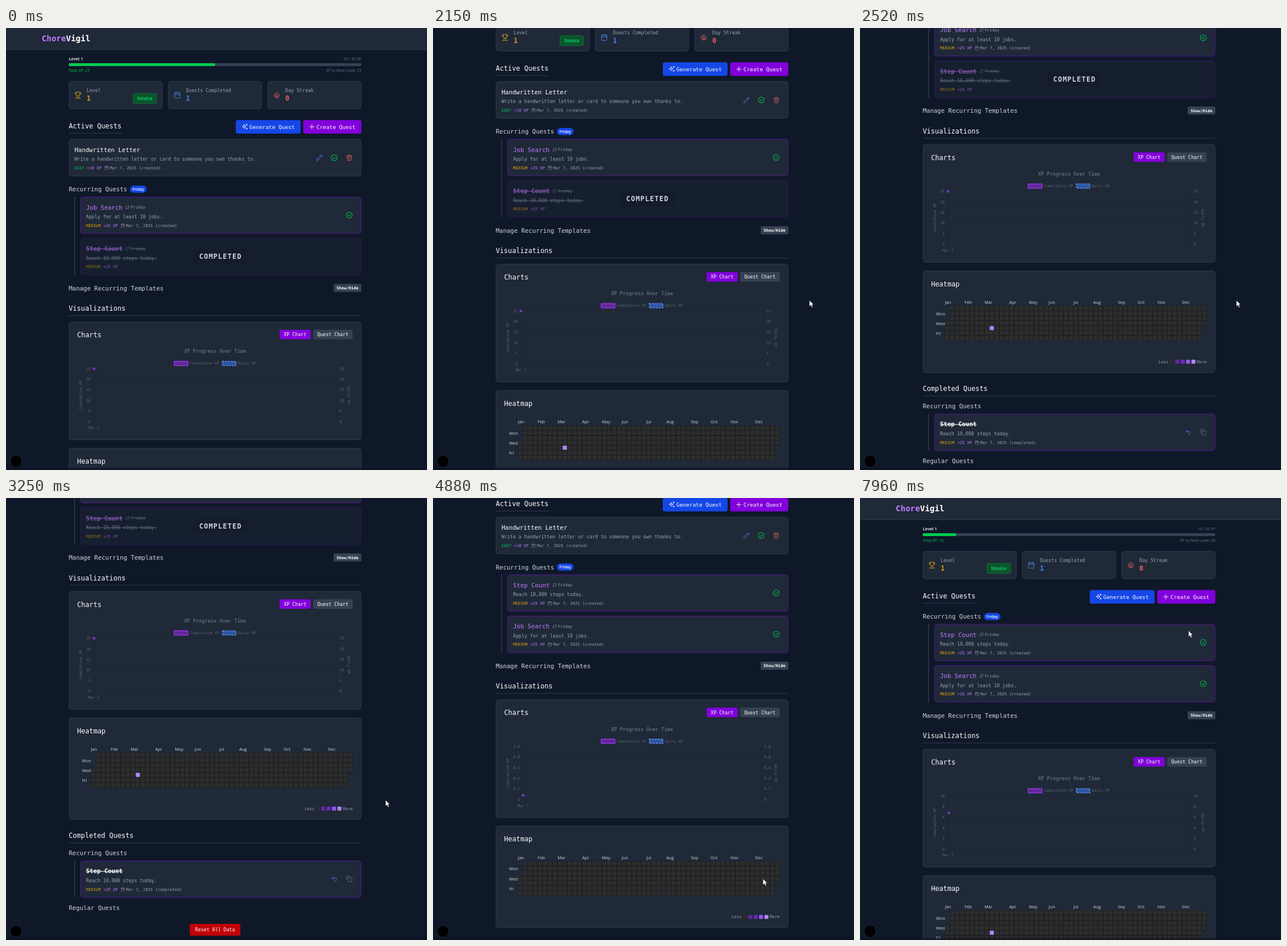
An HTML page for the animation above (8000 ms loop, 731 by 766 pixels).

```html
<!DOCTYPE html>
<html lang="en">
<head>
<meta charset="utf-8">
<title>Quest dashboard</title>
<style>
  html, body { margin: 0; width: 100%; height: 100%; overflow: hidden; background: #0f1828; }
  svg { display: block; width: 731px; height: 766px; }
  text { font-family: "DejaVu Sans Mono", "Noto Sans Mono", monospace; white-space: pre; }
  .sans { font-family: "Open Sans", "Noto Sans", sans-serif; }
  .mid { text-anchor: middle; }
  .end { text-anchor: end; }
  .w6 { font-weight: 600; }
  .w7 { font-weight: 700; }
  .strike { text-decoration: line-through; }
  .done { opacity: .6; filter: blur(.35px); }
</style>
</head>
<body>
<svg id="stage" viewBox="0 0 731 766"></svg>
<script>
const LOOP = 8000, S = .5848;
const C = {
  card: '#1f2938', line: '#364153', white: '#fff', soft: '#d1d5dc', gray: '#99a1af', dim: '#6a7282',
  lilac: '#c27aff', purple: '#8200db', edge: '#6e11b0', blue: '#1447e6', sky: '#4a86e6', green: '#00c950',
  gold: '#d39e12', red: '#e0635f', axis: '#5f6672', cell: '#2d2d2c', hot: '#b185f5'
};

const ICONS = {
  trophy: 'M6 9H4.5a2.5 2.5 0 0 1 0-5H6M18 9h1.5a2.5 2.5 0 0 0 0-5H18M4 22h16M10 14.7V17c0 .6-.5 1-1 1.2C7.9 18.7 7 20.2 7 22M14 14.7V17c0 .6.5 1 1 1.2 1.1.5 2 2 2 3.8M18 2H6v7a6 6 0 0 0 12 0z',
  calendar: 'M8 2v4M16 2v4M3 10h18M5 4h14a2 2 0 0 1 2 2v14a2 2 0 0 1-2 2H5a2 2 0 0 1-2-2V6a2 2 0 0 1 2-2z',
  flame: 'M15.4 5.2A8.25 8.25 0 0 1 12 21 8.25 8.25 0 0 1 6 7a8.3 8.3 0 0 0 3 2.6 9 9 0 0 1 3.4-6.9 8.2 8.2 0 0 0 3 2.5zM12 18a3.75 3.75 0 0 0 .5-7.5 6 6 0 0 0-1.9 3.6 6 6 0 0 1-2.100-1A3.75 3.75 0 0 0 12 18z',
  sparkles: 'M10 4l1.8 5.2L17 11l-5.2 1.8L10 18l-1.8-5.2L3 11l5.2-1.8zM19 2v5M16.5 4.5h5M19 16v5M16.5 18.5h5',
  plus: 'M4 12h16M12 4v16',
  pencil: 'M17 3a2.8 2.8 0 0 1 4 4L7.5 20.5 2 22l1.5-5.5zM15 5l4 4',
  check: 'M21 12a9 9 0 1 1-18 0 9 9 0 0 1 18 0M9 12.75 11.25 15 15 9.75',
  trash: 'M3 6h18M19 6v14a2 2 0 0 1-2 2H7a2 2 0 0 1-2-2V6M8 6V4a2 2 0 0 1 2-2h4a2 2 0 0 1 2 2v2M10 11v6M14 11v6',
  refresh: 'M3 12a9 9 0 0 1 15.5-6.3L21 8M21 3v5h-5M21 12a9 9 0 0 1-15.5 6.3L3 16M3 21v-5h5',
  undo: 'M9 14 4 9l5-5M4 9h10.5a5.5 5.5 0 0 1 0 11H11',
  copy: 'M10 8h10a2 2 0 0 1 2 2v10a2 2 0 0 1-2 2H10a2 2 0 0 1-2-2V10a2 2 0 0 1 2-2zM4 16a2 2 0 0 1-2-2V4a2 2 0 0 1 2-2h10a2 2 0 0 1 2 2'
};

// y is the middle of the capitals; size is in page pixels before scaling
const text = (s, x, y, size, fill, cls = '', more = '') =>
  `<text x="${x}" y="${y + size * S * .365}" font-size="${size * S}" fill="${fill}" class="${cls}" ${more}>${s}</text>`;
const rect = (x, y, x2, y2, fill, r = 0, more = '') =>
  `<rect x="${x}" y="${y}" width="${x2 - x}" height="${y2 - y}" rx="${r}" fill="${fill}" ${more}/>`;
const box = (x, y, x2, y2, stroke = C.line, more = '') =>
  rect(x + .4, y + .4, x2 - .4, y2 - .4, C.card, 4.5, `stroke="${stroke}" stroke-width=".8" ${more}`);
const line = (x, y, x2, y2, stroke = C.line, w = .8) =>
  `<path d="M${x} ${y}L${x2} ${y2}" stroke="${stroke}" stroke-width="${w}"/>`;
const icon = (name, cx, cy, size, color) =>
  `<path d="${ICONS[name]}" transform="translate(${cx - size / 2} ${cy - size / 2}) scale(${size / 24})"
    fill="none" stroke="${color}" stroke-width="1.8" stroke-linecap="round" stroke-linejoin="round"/>`;
const shift = (dy, body) => `<g transform="translate(0 ${dy})">${body}</g>`;

function tags(x, y, level, color, xp, date) {
  const x2 = x + (level.length + 1) * 4.225 + .4;
  return text(level, x, y, 12, color) + text(xp, x2, y, 12, C.lilac) +
    (date ? icon('calendar', x2 + 34, y, 7.2, C.gray) + text(date, x2 + 39.6, y, 12, C.gray) : '');
}

function stat(x, name, glyph, value, color) {
  return box(x, 92, x + 163, 140.5) + icon(glyph, x + 16, 116.3, 12.5, color) +
    text(name, x + 31, 107.8, 14, C.gray) + text(value, x + 31, 122.2, 20, color, 'w7');
}

function header(p) {
  return rect(0, 0, 731, 37.5, C.card) + line(0, 37.5, 731, 37.5) +
    text('Chore<tspan fill="#fff">Vigil</tspan>', 62, 18.3, 24, C.lilac, 'w7') +
    text('Level 1', 109, 53.3, 12.8, C.white, 'sans w6') +
    text(`${p.xp} / 50 XP`, 617, 53.3, 11.5, C.dim, 'sans end') +
    rect(109, 61, 617, 66, C.line, 2) + rect(109, 61, 109 + 508 * p.xp / 50, 66, C.green, p.xp ? 1.5 : 0, 'data-bar') +
    text('Total XP: ' + p.xp, 109, 73.3, 11.5, C.green, 'sans') +
    text('XP to Next Level: ' + (50 - p.xp), 617, 73.3, 11.5, C.dim, 'sans end') +
    stat(109, 'Level', 'trophy', 1, C.gold) +
    rect(220.4, 113.4, 261.6, 130.6, '#0d542b', 3, 'stroke="#008236" stroke-width=".8"') +
    text('Novice', 241, 122.2, 13.8, '#05df72', 'sans w6 mid') +
    stat(281.3, 'Quests Completed', 'calendar', p.count, C.sky) +
    stat(454, 'Day Streak', 'flame', 0, C.red) +
    text('Active Quests', 109, 169.3, 20, C.white) + line(109, 182.3, 201, 182.3) +
    rect(399, 159.5, 511.5, 183, C.blue, 3.5) + icon('sparkles', 414.5, 171.2, 11.7, C.white) +
    text('Generate Quest', 422.5, 171.2, 16, C.white) +
    rect(516, 159.5, 617, 183, C.purple, 3.5) + icon('plus', 531, 171.2, 11.7, C.white) +
    text('Create Quest', 539, 171.2, 16, C.white);
}

function letterCard() {
  return '<g data-letter>' + box(109, 192.5, 617, 257) +
    text('Handwritten Letter', 119, 210.7, 18, C.white) +
    text('Write a handwritten letter or card to someone you own thanks to.', 119, 227.3, 14, C.gray) +
    tags(119, 242.3, 'EASY', C.green, '+10 XP', 'Mar 7, 2025 (created)') +
    '<circle data-hover cx="570" cy="224.8" r="11" fill="#364153" opacity="0"/>' +
    icon('pencil', 544.3, 224.8, 11.5, C.sky) + icon('check', 570, 224.8, 13.5, C.green) +
    icon('trash', 596, 224.8, 11.5, C.red) + '</g>';
}

function recurring(dy, name, desc, done) {
  const st = done ? 'strike' : '';
  const body = text(name, 139, 310.7, 18, C.lilac, done ? 'w7 strike' : '') +
    icon('refresh', 211, 310.7, 7, C.gray) + text('Friday', 216.7, 310.5, 12, C.gray, st) +
    text(desc, 139, 327.2, 14, C.gray, st) +
    tags(139, 342.2, 'MEDIUM', '#e3a008', '+25 XP', done ? '' : 'Mar 7, 2025 (created)') +
    (done ? '' : icon('check', 596, 324.3, 13.5, C.green));
  const stamp = rect(326, 311.5, 419, 337, '#141c2c', 3) +
    text('COMPLETED', 335.5, 324.7, 20, C.soft, 'w7', 'letter-spacing="1.17"');
  return shift(dy, box(129, 292.5, 617, 356.5, C.edge, done ? 'opacity=".45"' : '') +
    `<g class="${done ? 'done' : ''}">${body}</g>` + (done ? stamp : ''));
}

function chart(p) {
  let s = box(109, 509, 617, 714) + text('Charts', 123.5, 531.9, 20, C.white) +
    rect(475, 523, 529, 539.5, C.purple, 2.5) + text('XP Chart', 502, 531.5, 14, C.white, 'mid') +
    rect(533.5, 523, 602, 539.5, C.line, 2.5) + text('Quest Chart', 567.5, 531.5, 14, C.white, 'mid') +
    text('XP Progress Over Time', 363, 560.2, 14.6, C.axis, 'w7 mid') +
    rect(292.2, 577.7, 315.8, 585, '#602799', 0, 'stroke="#8f35dc" stroke-width="1.6"') +
    text('Cumulative XP', 319.3, 581, 11.1, C.axis) +
    rect(375.7, 577.7, 399.3, 585, '#2d55a5', 0, 'stroke="#5f92e4" stroke-width="1.6" stroke-dasharray="3 2"') +
    text('Daily XP', 402.4, 581, 11.1, C.axis);
  const pad = p.wide ? 4 : 0;
  p.ticks.forEach((v, i) => {
    const y = 590.3 + i * 18.4;
    s += line(153 + pad, y, 574 - pad, y, 'rgba(0,0,0,.1)', .6) +
      text(v, 147 + pad, y, 11.1, C.axis, 'end') + text(v, 579 - pad, y, 11.1, C.axis);
  });
  const turned = (label, x, y, a) =>
    `<g transform="translate(${x} ${y}) rotate(${a})">${text(label, 0, 0, 11.1, C.axis, 'mid')}</g>`;
  return s + line(153 + pad, 590, 153 + pad, 686, 'rgba(0,0,0,.1)', .6) +
    line(574 - pad, 590, 574 - pad, 682, 'rgba(0,0,0,.1)', .6) +
    text('Mar 7', 152.7 + pad, 693, 11.1, C.axis, 'mid') +
    turned('Cumulative XP', 130, 636.5, -90) + turned('Daily XP', 595.5, 636.5, 90) +
    '<circle data-dot r="1.7" fill="#5b2a92" stroke="#8f45e6" stroke-width="1.1"/>';
}

function heatmap(hot) {
  const step = 8.58, size = 7.3, x0 = 148, y0 = 789.5;
  const weeks = [0, 4, 8, 13, 17, 21, 26, 30, 35, 39, 43, 48];
  let s = box(109, 728, 617, 905) + text('Heatmap', 123.5, 751, 20, C.white);
  'Jan Feb Mar Apr May Jun Jul Aug Sep Oct Nov Dec'.split(' ').forEach((m, i) =>
    s += text(m, x0 - .5 + weeks[i] * step, 782.7, 12.7, C.soft, 'sans'));
  ['Mon', 'Wed', 'Fri'].forEach((d, i) => s += text(d, 132, 802.5 + i * 17.1, 12.7, C.soft, 'sans'));
  for (let day = 3; day < 368; day++) {
    const col = Math.floor(day / 7), row = day % 7, x = x0 + col * step, y = y0 + row * step;
    s += rect(x, y, x + size, y + size, hot && col === 9 && row === 4 ? C.hot : C.cell, 1,
      'stroke="#1a1c1f" stroke-width="1.2" paint-order="stroke"');
  }
  s += text('Less', 518.5, 885.7, 12, C.gray) + text('More', 585, 885.7, 12, C.gray);
  [C.cell, '#5b2c98', '#7424c4', '#9357e8', C.hot].forEach((c, i) =>
    s += rect(538 + i * 9.35, 882.2, 545 + i * 9.35, 889.2, c, 1.5));
  return s;
}

function completed(has) {
  const list = text('Recurring Quests', 109, 962.8, 18, C.soft) + line(119.3, 976, 119.3, 1040, C.line, 1.2) +
    box(129, 976, 617, 1040, C.edge) + text('Step Count', 139, 994, 18, C.white, 'w7 strike') +
    text('Reach 10,000 steps today.', 139, 1010.7, 14, C.gray) +
    tags(139, 1025.7, 'MEDIUM', C.gold, '+25 XP', 'Mar 7, 2025 (completed)') +
    icon('undo', 570, 1007.8, 11.5, C.sky) + icon('copy', 596, 1007.8, 11.5, C.dim) +
    text('Regular Quests', 109, 1057.8, 18, C.soft);
  const none = text('No completed quests yet. Complete some quests to see them here!', 362.7, 980.2, 16, C.gray, 'mid');
  return text('Completed Quests', 109, 932, 20, C.white) + line(109, 945, 617, 945) + (has ? list : none) +
    shift(has ? 0 : -60, rect(319, 1085.5, 407, 1106, '#c10007', 2.5) +
      text('Reset All Data', 363, 1095.7, 14, C.white, 'mid'));
}

function page(p) {
  const job = ['Job Search', 'Apply for at least 10 jobs.'], steps = ['Step Count', 'Reach 10,000 steps today.'];
  const [a, b] = p.stepsDone ? [job, steps] : [steps, job];
  const lower = text('Recurring Quests', 109, 279.5, 18, C.soft) + rect(215.3, 273.3, 244, 285.6, C.blue, 6.1) +
    text('Friday', 229.6, 279.5, 11.5, C.white, 'sans mid w6') + line(119.3, 292, 119.3, 428.5, C.line, 1.2) +
    recurring(0, ...a) + recurring(71.5, ...b, p.stepsDone) +
    text('Manage Recurring Templates', 109, 450.7, 18, C.soft) +
    rect(569, 443.5, 617, 457.5, C.line, 2) + text('Show/Hide', 593, 450.5, 12, C.white, 'w6 mid') +
    text('Visualizations', 109, 486, 20, C.white) + line(109, 498.5, 617, 498.5) +
    chart(p) + heatmap(p.hot) + completed(p.stepsDone);
  return '<g data-page>' + header(p) + (p.letter ? letterCard() : '') + shift(p.letter ? 0 : -74, lower) + '</g>';
}

const pages = [
  { xp: 25, count: 1, stepsDone: true, letter: true, hot: true, ticks: [25, 20, 15, 10, 5, 0] },
  { xp: 0, count: 0, letter: true, wide: true, ticks: ['1.0', '0.8', '0.6', '0.4', '0.2', '0'] },
  { xp: 10, count: 1, hot: true, ticks: [10, 8, 6, 4, 2, 0] }
];

const stage = document.getElementById('stage');
stage.innerHTML = rect(0, 0, 731, 766, '#0f1828') + pages.map(page).join('') +
  rect(0, 762, 731, 766, '#0a1120', 0, 'opacity=".6"') +
  '<circle cx="17.5" cy="751" r="10.5" fill="#000" stroke="#2b3342" stroke-width=".8"/>' +
  '<path id="cursor" d="M0 0V10.5L2.5 8.3 4.2 12.3 6 11.5 4.3 7.6H7.5z" fill="#fff" stroke="#111" stroke-width=".5"/>';

const cursor = document.getElementById('cursor');
const views = [...stage.querySelectorAll('[data-page]')].map(el => ({
  el, bar: el.querySelector('[data-bar]'), dot: el.querySelector('[data-dot]'),
  letter: el.querySelector('[data-letter]'), hover: el.querySelector('[data-hover]')
}));

const RESET = 4320, DONE = 7680;
const SCROLL = [[1950, 0], [2000, 20], [2150, 99.5], [2400, 231], [2560, 332], [2600, 347.5],
  [RESET - 1, 347.5], [RESET, 287.5], [4690, 287.5], [5120, 0]];
const POINTER = [[80, 704, 733], [250, 645, 495], [440, 645, 495], [620, 653, 477], [980, 653, 477],
  [1240, 653.5, 472], [2870, 653.5, 472], [3050, 660, 529], [3190, 660, 529], [3250, 659, 523.5],
  [3480, 659, 523.5], [4100, 560, 650], [4290, 573, 660], [5140, 573, 660], [5420, 562, 473],
  [5960, 569, 220], [6200, 569.5, 221], [6440, 570.5, 225], [6700, 570.5, 225], [6770, 570.5, 229],
  [7060, 570.5, 230]];

const clamp = v => Math.min(1, Math.max(0, v));
const outQuart = p => 1 - (1 - clamp(p)) ** 4;
const smooth = p => (p = clamp(p), p * p * (3 - 2 * p));
function track(keys, t) {
  const i = keys.findIndex(k => k[0] > t);
  if (i < 0) return keys[keys.length - 1].slice(1);
  if (i === 0) return keys[0].slice(1);
  const a = keys[i - 1], b = keys[i], p = (t - a[0]) / (b[0] - a[0]);
  return a.slice(1).map((v, n) => v + (b[n + 1] - v) * p);
}

function draw(t) {
  const now = t < RESET ? 0 : t < DONE ? 1 : 2, v = views[now];
  views.forEach((w, i) => w.el.setAttribute('display', i === now ? 'inline' : 'none'));
  v.el.setAttribute('transform', `translate(0 ${-track(SCROLL, t)[0]})`);

  const p = now === 1 ? outQuart((t - 4414) / 1000) : now === 2 ? 1 - outQuart((t - 7712) / 1000) : 0;
  v.dot.setAttribute('cx', 152.7 + 4.3 * p);
  v.dot.setAttribute('cy', 590.5 + 92 * p);
  if (now === 2) v.bar.setAttribute('width', 101.6 * smooth((t - 7687) / 500));
  if (now === 1) {
    v.hover.setAttribute('opacity', clamp((t - 5840) / 120));
    v.letter.setAttribute('opacity', 1 - clamp((t - 7480) / 200));
  }

  const [x, y] = track(POINTER, t);
  cursor.setAttribute('display', t < 80 ? 'none' : 'inline');
  cursor.setAttribute('transform', `translate(${x} ${y})`);
}

const start = performance.now();
function tick() {
  draw((performance.now() - start) % LOOP);
  requestAnimationFrame(tick);
}
tick();
</script>
</body>
</html>
```
